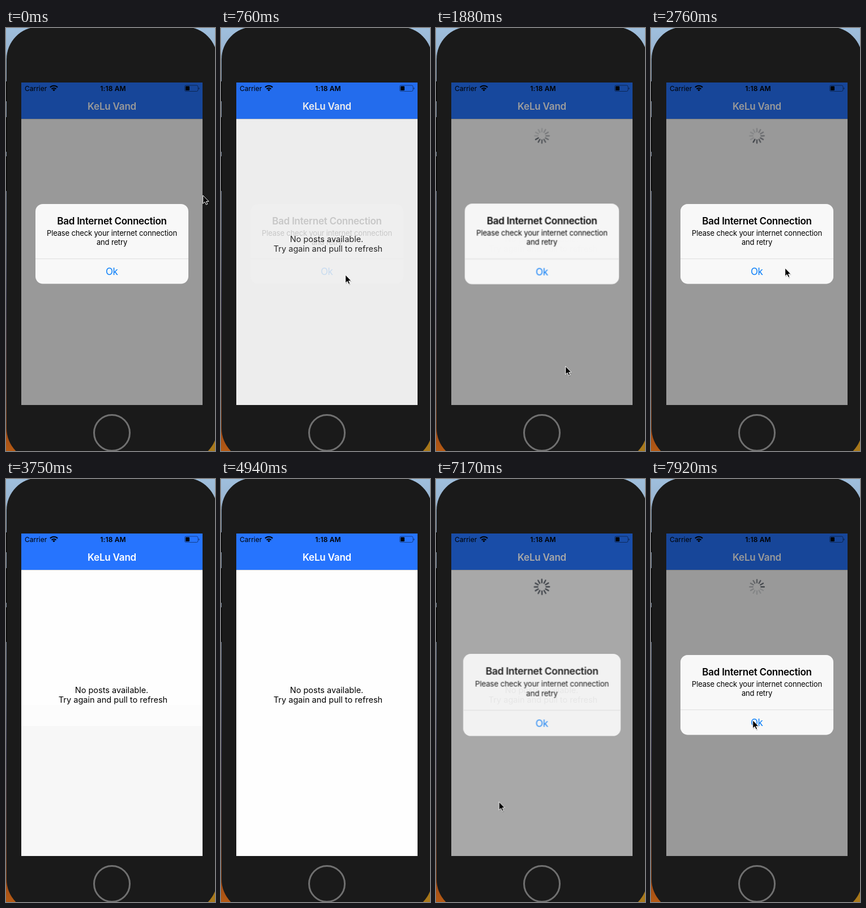
These frames come from a looping animation (369 px wide and 745 px high, 8000 ms). An HTML page:

```html
<!DOCTYPE html>
<html lang="en">
<head>
<meta charset="utf-8">
<title>Pull to refresh</title>
<style>
html, body { margin: 0; width: 100%; height: 100%; overflow: hidden; background: #1a1a1a; }
svg { display: block; width: 369px; height: 745px; }
text { font-family: Inter, Roboto, sans-serif; }
.mid { text-anchor: middle; }
.bold { font-weight: 600; }
.note { font: 14.5px "Open Sans", "Noto Sans", sans-serif; }

.fade, .glow, .pop, .press, .pull, .ring, .busy, .phase, .cursor, .tail { animation: 8s linear infinite; }
.fade { animation-name: fade; }
.glow { animation-name: glow; }
.pop { animation-name: pop; transform-origin: 187px 380px; }
.press { animation-name: press; }
.pull { animation-name: pull; }
.ring { animation-name: ring; }
.busy { animation-name: busy; }
.phase { animation-name: phase; }
.spin { animation: spin 1s steps(12) infinite; }
.cursor { animation-name: cursor; }
.tail { animation-name: tail; }
.pull, .busy, .phase, .spin { transform-origin: 0 0; }

/* alert and dimming */
@keyframes fade {
  0%, 8% { opacity: 1; animation-timing-function: cubic-bezier(.2,.6,.4,1); }
  11.25%, 20.55% { opacity: 0; animation-timing-function: cubic-bezier(.22,.8,.3,1); }
  25.5% { opacity: 1; }
  38.75% { opacity: 1; animation-timing-function: cubic-bezier(.2,.6,.4,1); }
  42%, 87.75% { opacity: 0; animation-timing-function: cubic-bezier(.22,.8,.3,1); }
  92.75%, 100% { opacity: 1; }
}
/* brighter panel while the alert appears */
@keyframes glow {
  0%, 20.55% { opacity: 0; animation-timing-function: cubic-bezier(.22,.8,.3,1); }
  25.5%, 38.7% { opacity: .6; }
  38.75%, 87.75% { opacity: 0; animation-timing-function: cubic-bezier(.22,.8,.3,1); }
  92.75%, 100% { opacity: .6; }
}
@keyframes pop {
  0%, 11.25% { transform: scale(1); }
  11.26%, 20.55% { transform: scale(1.2); animation-timing-function: cubic-bezier(.22,.8,.3,1); }
  25.5%, 42% { transform: scale(1); }
  42.01%, 87.75% { transform: scale(1.2); animation-timing-function: cubic-bezier(.22,.8,.3,1); }
  92.75%, 100% { transform: scale(1); }
}
@keyframes press {
  0%, 7.24% { opacity: 0; }
  7.25%, 8.1% { opacity: 1; }
  8.6%, 37.36% { opacity: 0; }
  37.37%, 38.8% { opacity: 1; }
  39.3%, 100% { opacity: 0; }
}

/* refresh spinner */
@keyframes ring {
  0%, 17.8% { stroke-dashoffset: 12; animation-timing-function: steps(12); }
  20.3%, 50% { stroke-dashoffset: 0; }
  50.01%, 85% { stroke-dashoffset: 12; animation-timing-function: steps(12); }
  87.5%, 100% { stroke-dashoffset: 0; }
}
@keyframes pull {
  0%, 17.5% { opacity: 0; transform: none; }
  17.51%, 20.3% { opacity: 1; transform: scale(1) rotate(0deg); }
  20.8%, 21.5% { opacity: 1; transform: scale(1.15) rotate(-10deg); }
  22.5% { opacity: 1; transform: scale(1.03) rotate(0deg); }
  22.51%, 84.7% { opacity: 0; transform: none; }
  84.71%, 87.5% { opacity: 1; transform: scale(1) rotate(0deg); }
  88%, 88.7% { opacity: 1; transform: scale(1.15) rotate(-10deg); }
  89.7% { opacity: 1; transform: scale(1.03) rotate(0deg); }
  89.71%, 100% { opacity: 0; transform: none; }
}
@keyframes busy {
  0%, 22.5% { opacity: 0; transform: scale(1); }
  22.51%, 38.75% { opacity: 1; transform: scale(1); }
  42% { opacity: 0; transform: scale(.3); }
  42.01%, 89.7% { opacity: 0; transform: scale(1); }
  89.71%, 100% { opacity: 1; transform: scale(1); }
}
@keyframes phase {
  0%, 50% { transform: rotate(-60deg); }
  50.01%, 100% { transform: rotate(120deg); }
}
@keyframes spin { to { transform: rotate(360deg); } }

@keyframes tail {
  0%, 40.99% { opacity: 0; }
  41%, 61.74% { opacity: 1; }
  61.75%, 100% { opacity: 0; }
}

@keyframes cursor {
  0%, .5% { transform: translate(347px,294px); animation-timing-function: ease-in-out; }
  4.25%, 10% { transform: translate(219px,434px); animation-timing-function: ease-in-out; }
  15.75%, 17.5% { transform: translate(206px,190px); animation-timing-function: ease-in-out; }
  21% { transform: translate(228px,586px); }
  23%, 27.75% { transform: translate(228px,595px); animation-timing-function: ease-in-out; }
  34%, 43.5% { transform: translate(236px,422px); animation-timing-function: ease-in; }
  46%, 75.9% { transform: translate(-24px,350px); }
  76% { transform: translate(3px,326px); }
  77.1%, 79.1% { transform: translate(16px,321px); animation-timing-function: ease-in-out; }
  82.5%, 84.5% { transform: translate(186px,186px); animation-timing-function: ease-in-out; }
  88.4% { transform: translate(125px,575px); animation-timing-function: ease-out; }
  91%, 94.7% { transform: translate(103px,564px); animation-timing-function: ease-in-out; }
  98.8%, 100% { transform: translate(179px,424px); }
}
</style>
</head>
<body>
<svg viewBox="0 0 369 745">
  <defs>
    <linearGradient id="wall" x2="0" y2="1">
      <stop offset="0" stop-color="#9fbfdd"/>
      <stop offset=".2" stop-color="#8b9bb2"/>
      <stop offset=".5" stop-color="#6f7890"/>
      <stop offset=".65" stop-color="#4b4764"/>
      <stop offset=".85" stop-color="#6e4536"/>
      <stop offset=".96" stop-color="#a34d16"/>
      <stop offset="1" stop-color="#b55a14"/>
    </linearGradient>
    <clipPath id="screen"><rect x="27" y="96" width="320" height="568"/></clipPath>
    <mask id="sweep" maskUnits="userSpaceOnUse" x="-20" y="-20" width="40" height="40">
      <circle class="ring" r="9" fill="none" stroke="#fff" stroke-width="18" pathLength="12"
        stroke-dasharray="12" transform="rotate(-105)"/>
    </mask>
  </defs>

  <rect width="369" height="745" fill="url(#wall)"/>
  <rect x="340" y="690" width="29" height="55" fill="#a8781a"/>
  <rect x="1" y="-2" width="372" height="764" rx="57" fill="#1a1a1a"/>
  <g fill="#0c0c0c">
    <rect y="94" width="2" height="35"/>
    <rect y="157" width="2" height="61"/>
    <rect y="226" width="2" height="61"/>
  </g>
  <circle cx="187" cy="713" r="31.5" fill="none" stroke="#707070" stroke-width="3"/>

  <g clip-path="url(#screen)">
    <rect x="27" y="96" width="320" height="568" fill="#fefefe"/>
    <g class="tail">
      <rect x="27" y="398" width="320" height="37" fill="#fcfcfc"/>
      <rect x="27" y="435" width="320" height="229" fill="#f7f7f7"/>
    </g>
    <g class="mid note">
      <text x="186.5" y="377">No posts available.</text>
      <text x="189" y="394">Try again and pull to refresh</text>
    </g>

    <g transform="translate(187 190)" stroke="#666c75" stroke-width="2.3" stroke-linecap="round">
      <g class="pull"><g id="full" mask="url(#sweep)"/></g>
      <g class="busy"><g class="phase"><g class="spin" id="trail"/></g></g>
    </g>

    <rect x="27" y="96" width="320" height="64" fill="#2674fe"/>
    <rect x="27" y="160" width="320" height="1" fill="#000" opacity=".14"/>
    <text class="mid bold" x="187" y="144" font-size="17" letter-spacing="-.2" fill="#fff">KeLu Vand</text>

    <rect class="fade" x="27" y="96" width="320" height="568" fill="#000" fill-opacity=".4"/>

    <g font-size="12">
      <text x="33" y="110.5">Carrier</text>
      <text class="mid bold" x="189" y="110.5" letter-spacing=".15">1:18 AM</text>
    </g>
    <g fill="none" stroke="#000" stroke-width="2.1">
      <path d="M77.9 104.6A9.2 9.2 0 0 1 91.1 104.6"/>
      <path d="M80.6 107.4A5.5 5.5 0 0 1 88.4 107.4"/>
    </g>
    <path d="M84.5 111.3L82.2 108.9A3.3 3.3 0 0 1 86.8 108.9Z"/>
    <rect x="315.5" y="101" width="23.5" height="10.5" rx="2.5" fill="none" stroke="#000" stroke-opacity=".45"/>
    <path d="M340 104.5a2 2 0 0 1 0 3.8z" fill-opacity=".5"/>
    <rect x="317" y="102.5" width="7" height="7.5" rx="1"/>

    <g class="pop">
      <rect class="glow" x="52" y="310" width="270" height="140.5" rx="13" fill="#f8f8f8"/>
      <g class="fade">
        <rect x="52" y="310" width="270" height="140.5" rx="13" fill="#f8f8f8"/>
        <path class="press" d="M52 406.5H322V437.5a13 13 0 0 1-13 13H65a13 13 0 0 1-13-13Z" fill="#e4e4e4"/>
        <rect x="52" y="406" width="270" height="1" fill="#dedede"/>
        <g class="mid">
          <text class="bold" x="187" y="346" font-size="17" letter-spacing="-.26">Bad Internet Connection</text>
          <g font-size="13" letter-spacing="-.16">
            <text x="187" y="366">Please check your internet connection</text>
            <text x="187" y="382">and retry</text>
          </g>
          <text x="186.8" y="435" font-size="17" letter-spacing="-.3" fill="#087dfa">Ok</text>
        </g>
      </g>
    </g>
  </g>

  <g class="cursor">
    <path d="M1.5 2.5V17L5 13.8 7.4 19 9.6 18 7.3 13H12Z" fill="#000" opacity=".22"/>
    <path d="M.7 .8V15.2L4 12.2 6.4 17.2 8.8 16.1 6.5 11.4H11Z" stroke="#fff" stroke-linejoin="round"/>
  </g>
</svg>
<script>
// twelve spokes, clockwise from the top
function addSpokes(id, alpha) {
  const group = document.getElementById(id);
  for (let i = 0; i < 12; i++) {
    const spoke = document.createElementNS("http://www.w3.org/2000/svg", "path");
    spoke.setAttribute("d", "M0 -7.2V-12.8");
    spoke.setAttribute("transform", `rotate(${i * 30})`);
    spoke.setAttribute("opacity", alpha(i));
    group.append(spoke);
  }
}
addSpokes("full", () => 1);
addSpokes("trail", i => Math.max(.22, 1 - ((12 - i) % 12) * .1));
</script>
</body>
</html>
```
